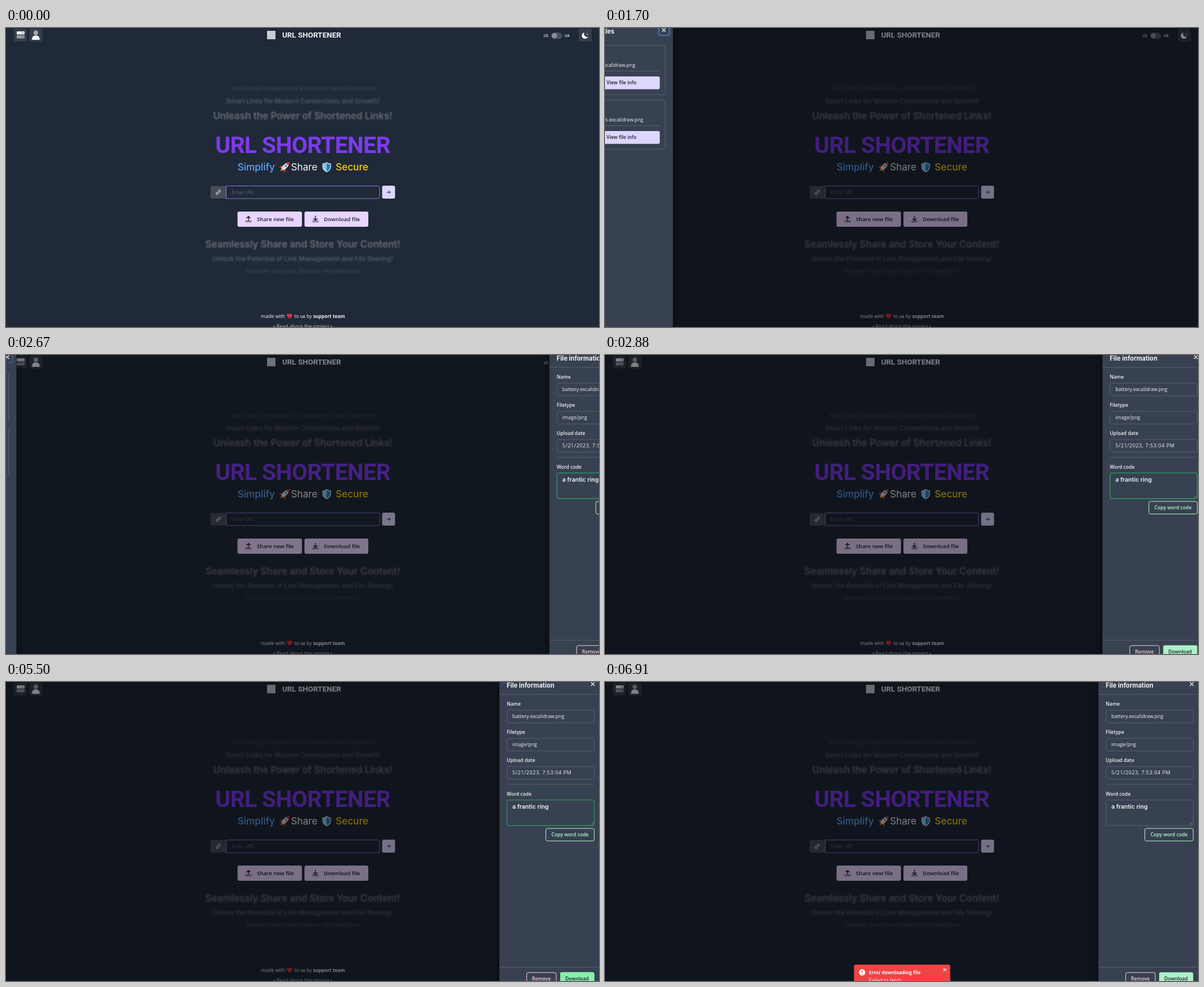
Recreate the animation shown at these times as an HTML page. Size 1054 by 531 pixels, loop 8 s.

```html
<!DOCTYPE html>
<html lang="en">
<head>
<meta charset="utf-8">
<title>URL Shortener</title>
<style>
  html, body { margin: 0; width: 100%; height: 100%; overflow: hidden; background: #1f2937; }
  svg { display: block; }
  text { font: 400 8.8px "Open Sans", "Noto Sans", sans-serif; fill: #f3f4f6; white-space: pre; }
  .strong { font-weight: 600; font-size: 8.6px; }
  .bold { font-weight: 700; font-size: 8.3px; }
  .tiny { font-weight: 600; font-size: 6.3px; }
  .mid { text-anchor: middle; }
  .dark { fill: #1a202c; }
  .brand { font: 700 13.4px Roboto, sans-serif; }
  .hero { font: 600 41px Roboto, sans-serif; letter-spacing: -.7px; fill: #7c3aed; }
  .tagline { font: 500 17.2px Inter, sans-serif; }
  .slogans text { font: 600 17px Inter, sans-serif; text-anchor: middle; filter: blur(.8px); fill: #fff; opacity: .32; }
  .slogans .far { font-size: 11.45px; opacity: .22; }
  .slogans .farthest { font-size: 9.2px; font-weight: 500; opacity: .13; }
  .heading { font: 700 11.1px Inter, sans-serif; }
  .action { font-weight: 600; font-size: 9.7px; }
  .date { font-size: 9px; letter-spacing: .55px; }
  .code { font: 600 10.5px Inter, sans-serif; }
  .line { fill: none; stroke: #566070; }
  .icon { fill: none; stroke: #1a202c; stroke-width: 1.4; stroke-linecap: round; stroke-linejoin: round; }
  .panel { fill: #374151; filter: drop-shadow(0 3px 3px #0003) drop-shadow(0 8px 11px #0006); }
  .cross { fill: none; stroke: #f3f4f6; stroke-width: 1.1; }
</style>
</head>
<body>
<svg width="1054" height="531" viewBox="0 0 1054 531">
  <rect width="1054" height="531" fill="#1f2937"/>

  <!-- top bar -->
  <g fill="#353f4b">
    <rect x="14" y="1" width="23" height="23" rx="3"/>
    <rect x="41.5" y="1" width="23" height="23" rx="3"/>
    <rect x="1018" y="1" width="23" height="23" rx="3"/>
  </g>
  <rect x="19" y="6" width="14" height="5.6" rx="1" fill="#f3f4f6"/>
  <rect x="19" y="13" width="14" height="5.6" rx="1" fill="#979ca4"/>
  <path d="M27.5 8.8h4M27.5 15.8h4" stroke="#4b5563" stroke-width="1.2" stroke-dasharray="1.4 1"/>
  <circle cx="53" cy="8.6" r="4" fill="#a3a8af"/>
  <path d="M46.3 21C46 15.5 48.5 13.3 53 13.3S60 15.5 59.7 21Z" fill="#f3f4f6"/>
  <rect x="464" y="5" width="15" height="15" fill="#c9ccd4"/>
  <text class="brand" x="491" y="17">URL SHORTENER</text>
  <text class="tiny" x="955.5" y="16.2">US</text>
  <rect x="969" y="8" width="19.5" height="11.5" rx="5.7" fill="#4a525f"/>
  <circle cx="974.8" cy="13.7" r="4.6" fill="#8b919b"/>
  <text class="tiny" x="993" y="16.2">UA</text>
  <path d="M1028 8a5.6 5.6 0 1 0 6.3 7.4A5.2 5.2 0 0 1 1028 8Z" fill="#fff"/>
  <path d="M1033.2 9v4M1031.2 11h4" stroke="#8b919b"/>

  <!-- hero -->
  <g class="slogans">
    <text class="farthest" x="528" y="111">Your Linking Companion for a Smoother Online Experience!</text>
    <text class="far" x="527.5" y="134">Smart Links for Modern Connections and Growth!</text>
    <text x="527.5" y="162">Unleash the Power of Shortened Links!</text>
    <text x="527.5" y="390">Seamlessly Share and Store Your Content!</text>
    <text class="far" x="527.5" y="414">Unlock the Potential of Link Management and File Sharing!</text>
    <text class="farthest" x="527.5" y="435">Empower Your Links, Enhance Your Workflow!</text>
  </g>
  <text class="hero mid" x="527.5" y="222">URL SHORTENER</text>
  <g>
    <text class="tagline" x="411.5" y="253" style="fill:#60a5fa">Simplify</text>
    <text class="tagline" x="506.5" y="253" style="font-weight:400">Share</text>
    <text class="tagline" x="586" y="253" style="fill:#facc15">Secure</text>
  </g>
  <g transform="translate(495.5 246.5) rotate(45)">
    <path d="M-2 6L0 11 2 6Z" fill="#f59e0b"/>
    <path d="M-3 0L-6.5 4.5V8L-2 5.5H2L6.5 8V4.5L3 0Z" fill="#c8342f"/>
    <path d="M0-11C4.5-7 4.5 1 2.6 6H-2.6C-4.5 1-4.5-7 0-11Z" fill="#d5dbe1"/>
    <path d="M0-11C1.8-9.4 2.8-7.6 3.2-6H-3.2C-2.8-7.6-1.8-9.4 0-11Z" fill="#dd3b3b"/>
    <circle cy="-2.5" r="1.8" fill="#3b82b8"/>
  </g>
  <g transform="translate(570 247)">
    <path d="M0-9Q3.5-6.2 7.6-6.2V0Q7 6.5 0 9.2-7 6.5-7.6 0V-6.2Q-3.5-6.2 0-9Z" fill="#c6d6e2"/>
    <path d="M0-7.2Q-3-4.9-6-4.8V0Q-5.5 5.2 0 7.6Z" fill="#7cc8f4"/>
    <path d="M0-7.2Q3-4.9 6-4.8V0Q5.5 5.2 0 7.6Z" fill="#2479b5"/>
  </g>

  <!-- URL form -->
  <path d="M391 280.5H366.5a3 3 0 0 0-3 3V300a3 3 0 0 0 3 3H391Z" fill="#464d58"/>
  <g transform="translate(377.3 291.8) rotate(-45)" fill="none" stroke="#e5e7eb" stroke-width="1">
    <path d="M-.8-1.8H-3a1.8 1.8 0 0 0 0 3.6H-.8M.8-1.8H3a1.8 1.8 0 0 1 0 3.6H.8M-2.2 0H2.2"/>
  </g>
  <path d="M391.5 280.5H661a3 3 0 0 1 3 3V300a3 3 0 0 1-3 3H391.5Z" fill="none" stroke="#8579d8"/>
  <text x="401" y="295" style="fill:#5d6673">Enter URL</text>
  <rect x="668.5" y="280" width="23" height="23" rx="3" fill="#ddd6fe"/>
  <path class="icon" d="M677 291.7h6M680.5 289l2.7 2.7-2.7 2.7" style="stroke-width:1"/>
  <rect x="411.5" y="326" width="114.5" height="27" rx="3.3" fill="#e9d5ff"/>
  <rect x="530.5" y="326" width="113.5" height="27" rx="3.3" fill="#e9d5ff"/>
  <path d="M425.5 341.5h11v3.7h-11ZM544.5 341.5h11v3.7h-11Z" fill="#93879f"/>
  <path class="icon" d="M431 342v-7.5M427.8 337.6l3.2-3.2 3.2 3.2M550 334v7.5M546.8 338.4l3.2 3.2 3.2-3.2"/>
  <text class="action dark" x="446" y="343">Share new file</text>
  <text class="action dark" x="565" y="343">Download file</text>

  <!-- footer -->
  <text x="453" y="514.6">made with</text>
  <path d="M504 516.2C501 513.6 499.2 512 499.2 510A2.4 2.4 0 0 1 504 509.2 2.4 2.4 0 0 1 508.8 510C508.8 512 507 513.6 504 516.2Z" fill="#dc2f3f"/>
  <text x="512.5" y="514.6">to</text>
  <text class="tiny" x="523" y="514.6">UA</text>
  <text x="534" y="514.6">by</text>
  <text class="bold" x="546" y="514.6">support team</text>
  <text class="mid" x="527.5" y="532.5" style="fill:#c3c8cf">• Read about the project •</text>

  <rect id="backdrop" width="1054" height="531"/>

  <!-- hosted files -->
  <g id="filesDrawer">
    <rect class="panel" x="-40" y="-20" width="218.3" height="571"/>
    <text class="heading" x="9.5" y="10">Hosted files</text>
    <rect id="closeRing" x="153" y="-8" width="19" height="21" rx="3" fill="none" stroke="#4285c0" stroke-width="1.7"/>
    <path class="cross" d="M159 .5l6.5 6.5M165.500 .5L159 7"/>
    <g id="fileCards"></g>
  </g>

  <!-- file information -->
  <g id="infoDrawer">
    <rect class="panel" x="877" y="-20" width="220" height="571"/>
    <text class="heading" x="890" y="10">File information</text>
    <path class="cross" d="M1039.700 .5l6.5 6.500M1046.200 .5l-6.500 6.500"/>
    <path class="line" d="M877 22H1060M877 506.500H1060M890.500 181.700H1045.500"/>
    <g id="fields"></g>
    <text class="strong" x="890" y="201.600">Word code</text>
    <rect class="line" x="890.500" y="209.500" width="155" height="45.500" rx="3"/>
    <rect id="codeFocus" x="890.500" y="209.500" width="155" height="45.500" rx="3" fill="none" stroke="#22b55c"/>
    <path d="M1039.500 253.500l4.500-4.500M1042 253.500l2-2" stroke="#9ca3af" stroke-width=".7"/>
    <text class="code" x="900" y="225.300">a frantic ring</text>
    <rect x="959.500" y="260" width="86" height="22.300" rx="3" fill="none" stroke="#bbf7d0"/>
    <text class="strong mid" x="1002.500" y="274.300" style="fill:#bbf7d0">Copy word code</text>
    <rect x="925.500" y="516" width="52.500" height="23" rx="3" fill="none" stroke="#fecdd3"/>
    <text class="strong mid" x="951.500" y="530" style="fill:#fecdd3">Remove</text>
    <g id="download">
      <rect x="985" y="515.500" width="60.500" height="24" rx="3" fill="#adf0c8"/>
      <rect id="downloadHover" x="985" y="515.500" width="60.500" height="24" rx="3" fill="#86efac"/>
      <text class="strong dark mid" x="1015" y="530">Download</text>
    </g>
  </g>

  <!-- error toast -->
  <g id="toast">
    <rect x="442.500" y="502" width="171" height="60" rx="3" fill="#ef4444"/>
    <circle cx="457" cy="515.700" r="5.600" fill="#fff"/>
    <path d="M457 512.500v3.600M457 517.600v1.400" stroke="#ef4444" stroke-width="1.400"/>
    <text class="bold" x="469" y="519">Error downloading file</text>
    <text x="469" y="532.500" style="fill:#fff">Failed to fetch</text>
    <path class="cross" d="M601.300 508.300l5.400 5.400M606.700 508.300l-5.400 5.400"/>
  </g>
</svg>

<script>
const LOOP = 8000;
const STEP = 70;
const PHASES = [1560, 2320, 3170, 3760, 5500, 6350];
const FILES_OPEN = 1535, SWITCH = 2550;
const $ = id => document.getElementById(id);

$('fileCards').innerHTML = ['battery', 'virtual_pcs'].map((name, i) => `
  <g transform="translate(0 ${i * 97})">
    <rect class="line" x="10" y="31" width="154.500" height="87.300" rx="3"/>
    <text class="strong" x="19" y="50.700">File</text>
    <text x="19" y="68.800">${name}.excalidraw.png</text>
    <path class="line" d="M19 76.500H155"/>
    <rect x="19" y="86" width="136" height="22.800" rx="3" fill="#ddd6fe"/>
    ${i ? '' : '<rect id="viewHover" x="19" y="86" width="136" height="22.800" rx="3" fill="#b7a3fc"/>'}
    <text class="strong dark mid" x="87" y="100.300">View file info</text>
  </g>`).join('');

$('fields').innerHTML = [
  ['Name', 'battery.excalidraw.png', ''],
  ['Filetype', 'image/png', ''],
  ['Upload date', '5/21/2023, 7:53:04 PM', 'date']
].map(([label, value, style], i) => `
  <g transform="translate(0 ${i * 50.1})">
    <text class="strong" x="890" y="41.500">${label}</text>
    <rect class="line" x="890.500" y="50" width="155" height="22.300" rx="3"/>
    <text class="${style}" x="900" y="64.300">${value}</text>
  </g>`).join('');

const ramp = (t, start, length) => Math.min(1, Math.max(0, (t - start) / length));
const easeOut = p => 1 - (1 - p) ** 3;
const easeInOut = p => p * p * (3 - 2 * p);
const fade = (t, start, length = 200) => easeInOut(ramp(t, start, length));

// Remaining distance of a spring with stiffness 180 and damping 25.
function spring(t, start) {
  const s = Math.max(0, t - start) / 1000;
  const decay = 12.5, freq = Math.sqrt(180 - decay * decay);
  const rest = Math.exp(-decay * s) * (Math.cos(freq * s) + decay / freq * Math.sin(freq * s));
  return Math.abs(rest) < .0006 ? 0 : rest;
}

// The screen refreshes in steps counted from the start of each phase.
function refreshTime(t) {
  const start = PHASES.filter(p => p <= t).pop();
  return start === undefined ? 0 : start + Math.floor((t - start) / STEP) * STEP;
}

function place(id, x, y, visible) {
  $(id).setAttribute('transform', `translate(${x} ${y})`);
  $(id).style.display = visible ? '' : 'none';
}

function render(now) {
  const t = refreshTime(now % LOOP);

  const filesExit = easeInOut(ramp(t, SWITCH, 150));
  const filesHidden = Math.max(spring(t, FILES_OPEN), filesExit);
  place('filesDrawer', -178.3 * filesHidden, 0, filesHidden < 1);
  place('infoDrawer', 177 * spring(t, SWITCH), 0, t > SWITCH);

  const firstShade = easeOut(ramp(t, FILES_OPEN, 200)) * (1 - ramp(t, SWITCH, 100) ** 2);
  const secondShade = easeOut(ramp(t, SWITCH, 200));
  $('backdrop').style.opacity = 1 - (1 - .48 * firstShade) * (1 - .48 * secondShade);

  $('viewHover').style.opacity = fade(t, 2290);
  $('closeRing').style.opacity = 1 - .5 * fade(t, 2340);

  $('codeFocus').style.opacity = 1 - fade(t, 5430, 250);
  $('downloadHover').style.opacity = fade(t, 3740) - fade(t, 6330);
  $('download').style.opacity = 1 - .6 * (fade(t, 5520) - fade(t, 6330));

  const toast = fade(t, 6310, 400);
  place('toast', 0, 13 * (1 - toast), toast > 0);
  $('toast').style.opacity = toast;
}

const begin = performance.now();
function frame() {
  render(performance.now() - begin);
  requestAnimationFrame(frame);
}
frame();
</script>
</body>
</html>
```
